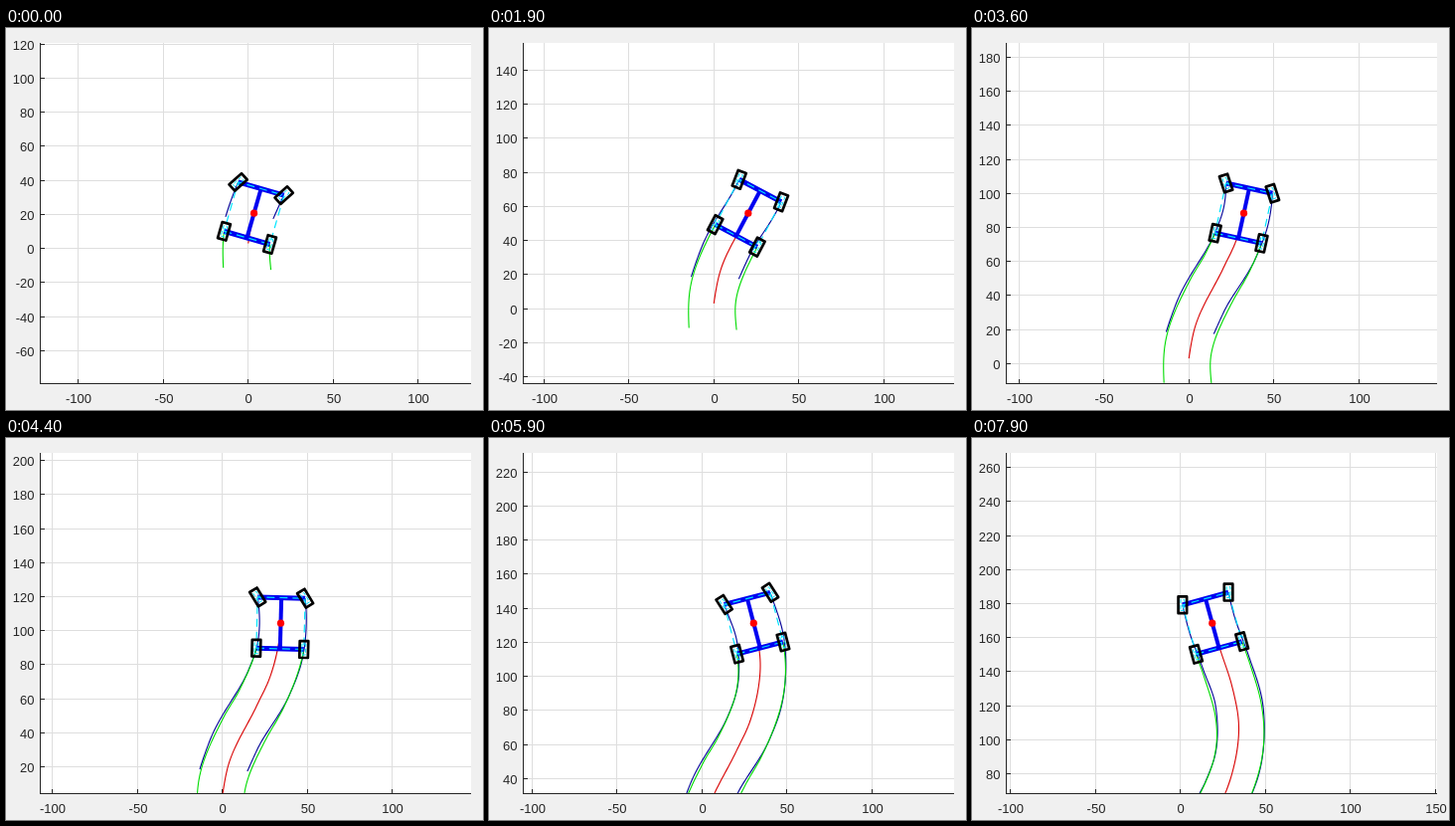
Animation, 480 px wide and 384 px high, one loop 8000 ms. Source, as an HTML page with a canvas:

```html
<!DOCTYPE html>
<html lang="en">
<head>
<meta charset="utf-8">
<title>Vehicle steering plot</title>
<style>
html, body { margin: 0; width: 100%; height: 100%; overflow: hidden; background: #f0f0f0; }
canvas { display: block; }
</style>
</head>
<body>
<canvas id="stage" width="480" height="384"></canvas>
<script>
const ctx = document.getElementById('stage').getContext('2d');
const LEFT = 35, RIGHT = 468, TOP = 16, BOTTOM = 357;
const SCALE = 1.711, MID_X = 250.9, MID_Y = 186.2;
const STEP = 100, STEPS = 80, FIRST = -9;
const HALF_TRACK = 14, HALF_BASE = 15;
const RAD = Math.PI / 180;
const CYAN = '#00e5ff', BLUE = '#0000f0';

// step, centre x, centre y, heading (clockwise degrees), steering angle
const keys = [
  [-9, 0, 3, 2.5, 35],
  [0, 3.4, 20.7, 16, 32],
  [19, 20.2, 56, 28, -7],
  [28, 27.8, 72.3, 22, -22],
  [44, 34.3, 104.4, 1.5, -33],
  [59, 30.4, 131.2, -14.6, -18],
  [71, 23.1, 153.9, -18.2, 3],
  [79, 18.7, 168.5, -15.4, 15.4]
];
const LAST = keys.length - 1;

const slope = (i, c) => (keys[i + 1][c] - keys[i][c]) / (keys[i + 1][0] - keys[i][0]);

function tangent(i, c) {
  if (i === 0) return (3 * slope(0, c) - tangent(1, c)) / 2;
  if (i === LAST) return (3 * slope(LAST - 1, c) - tangent(LAST - 1, c)) / 2;
  const before = keys[i][0] - keys[i - 1][0], after = keys[i + 1][0] - keys[i][0];
  return (after * slope(i - 1, c) + before * slope(i, c)) / (before + after);
}

// Cubic Hermite interpolation of one key column
function value(n, c) {
  let i = 0;
  while (i < LAST - 1 && n > keys[i + 1][0]) i++;
  const h = keys[i + 1][0] - keys[i][0], u = (n - keys[i][0]) / h, v = 1 - u;
  return v * v * (1 + 2 * u) * keys[i][c] + u * u * (3 - 2 * u) * keys[i + 1][c]
    + h * u * v * (v * tangent(i, c) - u * tangent(i + 1, c));
}

// Point at (side, ahead) in a frame turned clockwise by angle
const place = ([x, y], angle, side, ahead) => [
  x + side * Math.cos(angle) + ahead * Math.sin(angle),
  y - side * Math.sin(angle) + ahead * Math.cos(angle)
];

function pose(n) {
  const centre = [value(n, 1), value(n, 2)];
  const heading = value(n, 3) * RAD;
  const at = (side, ahead) => place(centre, heading, side * HALF_TRACK, ahead * HALF_BASE);
  return {
    centre, heading, steer: heading + value(n, 4) * RAD,
    rear: at(0, -1), front: at(0, 1),
    rl: at(-1, -1), rr: at(1, -1), fl: at(-1, 1), fr: at(1, 1)
  };
}

const poses = Array.from({ length: STEPS - FIRST }, (_, i) => pose(i + FIRST));

const wheelBox = (hub, angle, w = 2.5, h = 4.9) =>
  [[-w, -h], [w, -h], [w, h], [-w, h]].map(([s, a]) => place(hub, angle, s, a));

let originX, originY;
const px = x => originX + x * SCALE;
const py = y => originY - y * SCALE;

function line(points, color, width, { dash = [], closed = false } = {}) {
  ctx.beginPath();
  points.forEach(([x, y]) => ctx.lineTo(px(x), py(y)));
  if (closed) ctx.closePath();
  ctx.strokeStyle = color;
  ctx.lineWidth = width;
  ctx.setLineDash(dash);
  ctx.stroke();
}

function bar(x, y, w, h, color) {
  ctx.fillStyle = color;
  ctx.fillRect(x, y, w, h);
}

function drawAxes() {
  const xTicks = [], yTicks = [];
  for (let v = -200; v <= 300; v += 10) {
    const x = Math.floor(px(v)), y = Math.floor(py(v));
    if (v % 50 === 0 && x >= LEFT && x <= RIGHT) xTicks.push([v, x]);
    if (v % 20 === 0 && y >= TOP - 1 && y <= BOTTOM) yTicks.push([v, y]);
  }
  bar(0, 0, 480, 384, '#f0f0f0');
  bar(LEFT, TOP - 1, RIGHT - LEFT, BOTTOM - TOP + 1, '#fff');
  xTicks.forEach(([, x]) => bar(x, TOP - 1, 1, BOTTOM - TOP + 1, '#dedede'));
  yTicks.forEach(([, y]) => bar(LEFT, y, RIGHT - LEFT, 1, '#dedede'));
  const ink = '#262626';
  bar(LEFT - 1, TOP - 1, 1, BOTTOM - TOP + 2, ink);
  bar(LEFT - 1, BOTTOM, RIGHT - LEFT + 1, 1, ink);
  ctx.font = '13px "Liberation Sans", Arial, sans-serif';
  ctx.textAlign = 'center';
  xTicks.forEach(([v, x]) => {
    bar(x, BOTTOM - 4, 1, 4, ink);
    ctx.fillText(v, x + 1, 377);
  });
  ctx.textAlign = 'right';
  yTicks.forEach(([v, y]) => {
    bar(LEFT, y, 4, 1, ink);
    ctx.fillText(v, 28.5, y + 6);
  });
}

function draw(n) {
  const past = poses.slice(0, n - FIRST + 1);
  const car = past[past.length - 1];
  const trail = part => past.map(p => p[part]);
  const wheels = [
    [car.rl, car.heading], [car.rr, car.heading],
    [car.fl, car.steer], [car.fr, car.steer]
  ];
  const boxes = wheels.map(([hub, angle]) => wheelBox(hub, angle));

  // Vertical view follows the car, horizontal view centres the visible content
  originY = MID_Y + car.centre[1] * SCALE;
  const visible = [...['rl', 'rr', 'fl', 'fr'].flatMap(trail), ...boxes.flat()]
    .filter(([, y]) => py(y) <= BOTTOM).map(([x]) => x);
  originX = MID_X - SCALE * (Math.min(...visible) + Math.max(...visible)) / 2;

  drawAxes();
  ctx.save();
  ctx.beginPath();
  ctx.rect(LEFT, TOP - 1, RIGHT - LEFT, BOTTOM - TOP + 1);
  ctx.clip();
  ctx.lineJoin = 'round';

  line(trail('centre'), '#d80000', 1.1);
  ['fl', 'fr'].forEach(part => line(trail(part), '#000098', 1.1));
  ['rl', 'rr'].forEach(part => line(trail(part), '#00dc00', 1.1));

  line([car.rear, car.front], BLUE, 4);
  line([car.rl, car.rr], BLUE, 5);
  line([car.fl, car.fr], BLUE, 5);
  line([car.rl, car.rr, car.fr, car.fl], CYAN, 1.2, { dash: [8, 5], closed: true });
  wheels.forEach(([hub, angle]) =>
    line(wheelBox(hub, angle, 1.1, 3.2), CYAN, 1, { dash: [4, 2], closed: true }));
  boxes.forEach(box => line(box, '#000', 2.7, { closed: true }));

  ctx.beginPath();
  ctx.arc(px(car.centre[0]), py(car.centre[1]), 3.6, 0, 2 * Math.PI);
  ctx.fillStyle = '#f00';
  ctx.fill();
  ctx.restore();
}

const start = performance.now();
function tick() {
  draw(Math.floor((performance.now() - start) / STEP) % STEPS);
  requestAnimationFrame(tick);
}
tick();
</script>
</body>
</html>
```
